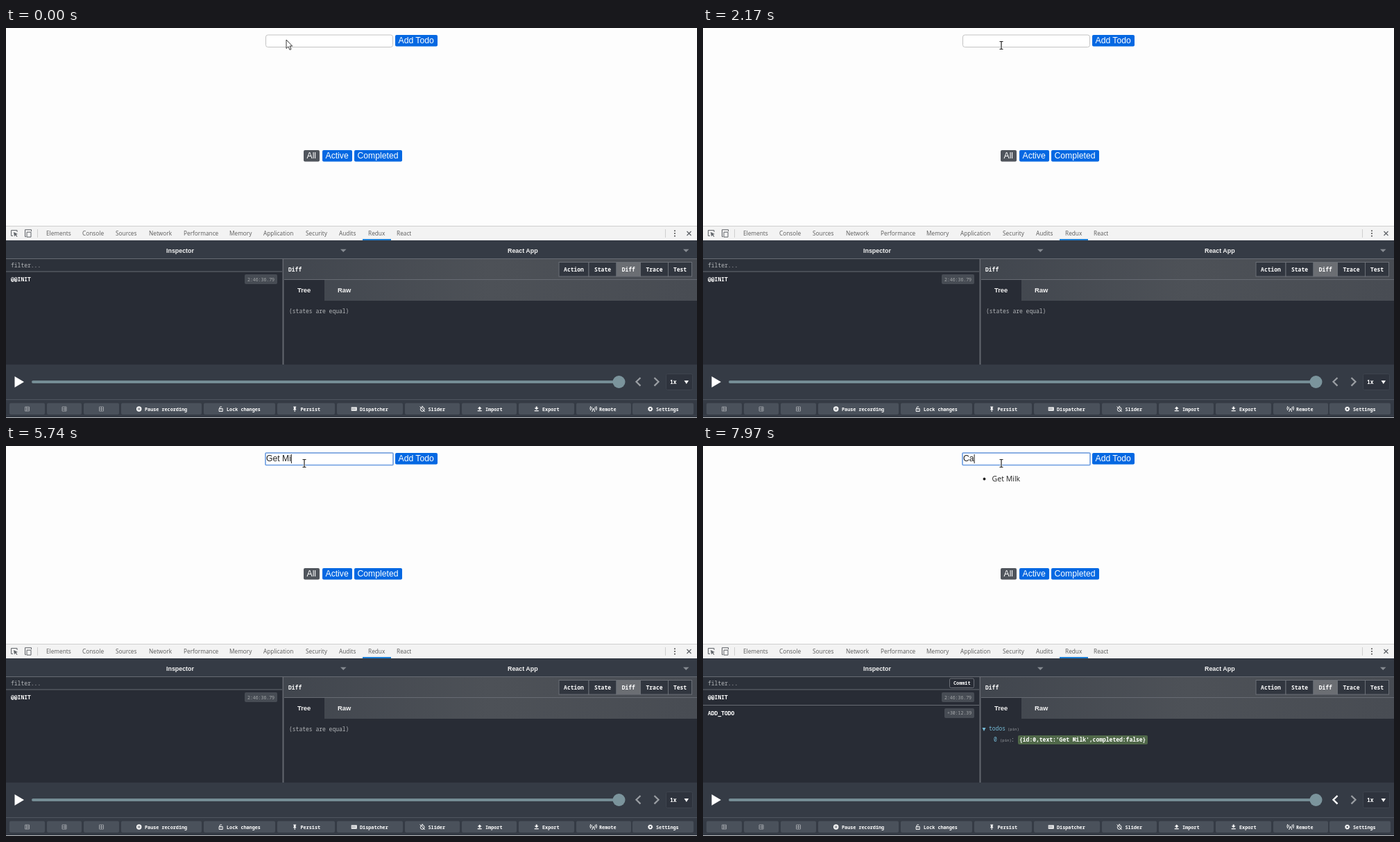
An HTML page that plays this animation: 996 by 562 pixels, repeating every 8 s.

```html
<!DOCTYPE html>
<html lang="en">
<head>
<meta charset="utf-8">
<title>Todo app with state inspector</title>
<style>
html, body { margin: 0; width: 100%; height: 100%; overflow: hidden; background: #fdfdfd; }
svg { display: block; width: 996px; height: 562px; }
text { white-space: pre; }
.app { font: 12.2px "Liberation Sans", Arial, sans-serif; }
.tabs { font: 8.3px "Open Sans", sans-serif; fill: #5a5a5a; }
.head { font: bold 8.9px "Liberation Sans", Arial, sans-serif; fill: #f4f4f4; }
.mono { font: 8px "Noto Sans Mono", monospace; fill: #b4b7ba; }
.bold { font-weight: bold; fill: #fff; }
.small { font-size: 6.8px; }
.time { font-size: 6.5px; fill: #a4a7aa; }
.pin { font-size: 5.6px; fill: #9a9da2; }
.key { fill: #76bcd8; }
.line { fill: none; stroke: #fff; }
.focus, .added { visibility: hidden; animation: 8s step-end infinite; }
.focus { animation-name: focus; }
.added { animation-name: added; }
#pointer { animation: travel 8s linear infinite; }
.arrow { animation: arrow 8s step-end infinite; }
.beam { visibility: hidden; animation: beam 8s step-end infinite; }
@keyframes focus { 42.5% { visibility: visible; } }
@keyframes added { 84.4% { visibility: visible; } }
@keyframes arrow { 24.2% { visibility: hidden; } }
@keyframes beam { 24.2% { visibility: visible; } }
@keyframes travel {
  0%, 1% { transform: translate(404px, 17px); animation-timing-function: ease-in-out; }
  11%, 18.8% { transform: translate(555px, 97px); animation-timing-function: ease-in-out; }
  25.5%, 100% { transform: translate(430px, 25px); }
}
</style>
</head>
<body>
<svg viewBox="0 0 996 562">
  <defs>
    <linearGradient id="bar">
      <stop offset="0" stop-color="#41464e"/>
      <stop offset=".5" stop-color="#4d5157"/>
      <stop offset="1" stop-color="#484c53"/>
    </linearGradient>
  </defs>
  <rect width="996" height="562" fill="#fdfdfd"/>

  <g class="app">
    <rect x="374.5" y="10" width="183" height="17.5" rx="3" fill="#fff" stroke="#c3c3c3"/>
    <rect class="focus" x="374" y="10" width="184" height="17.5" rx="1" fill="#fff" stroke="#6a9be0" stroke-width="1.6"/>
    <text id="typed" x="375" y="22" fill="#222"></text>
    <path id="caret" d="M0 12V25" stroke="#222"/>
    <g id="buttons" fill="#fff"></g>
    <g class="added">
      <circle cx="405.5" cy="47.5" r="1.9" fill="#222"/>
      <text x="416.5" y="50.5" font-size="10.6" fill="#222" font-family="Open Sans, sans-serif">Get Milk</text>
    </g>
  </g>

  <rect y="286" width="996" height="20" fill="#f3f3f3"/>
  <path d="M0 285.5H996M45.5 290V302M950.5 290V302" stroke="#cfcfcf"/>
  <g fill="none" stroke="#5f6368">
    <path d="M16 294V291.5H7.5V299.5H10"/>
    <path d="M11 294L17 297L14.5 297.8L16.5 300.5L15.5 301L13.5 298.6L12 300.5Z" fill="#5f6368" stroke="none"/>
    <path d="M29 300.5H27.5V290.5H36.5V293M30 294H36V301H30Z" transform="translate(0 .2)"/>
    <path d="M981.5 293L987.5 299M987.5 293L981.5 299" stroke-width="1.3"/>
  </g>
  <path d="M964 292.3h.01M964 296h.01M964 299.7h.01" stroke="#555" stroke-width="2.1" stroke-linecap="round"/>
  <g id="tabs" class="tabs"></g>
  <rect x="514" y="304" width="41" height="2" fill="#1c7fd6"/>

  <rect y="306" width="996" height="256" fill="#353b45"/>
  <rect y="333" width="996" height="152" fill="#282c35"/>
  <rect y="333" width="398" height="18" fill="#2c313a"/>
  <rect x="401" y="333" width="595" height="60" fill="url(#bar)"/>
  <rect x="401" y="363" width="58" height="30" fill="#282c35"/>
  <path d="M0 332.5H996M401 362.5H996M0 351H398" stroke="#676b73"/>
  <path d="M399.5 333V485" stroke="#63676f" stroke-width="2"/>
  <path d="M482 318.7H490.500L486.200 323ZM976 318.700H984.500L980.200 323Z" fill="#858a91"/>
  <g class="head">
    <text x="231" y="323.500">Inspector</text>
    <text x="723" y="323.500">React App</text>
    <g font-size="9.4"><text x="420" y="381">Tree</text><text x="478" y="381">Raw</text></g>
  </g>

  <g class="mono">
    <text x="7" y="344.500">filter...</text>
    <text class="bold" x="7" y="365">@@INIT</text>
    <rect x="344" y="355" width="47" height="14" rx="2" fill="#474c54"/>
    <text class="time" x="348" y="364.500">2:46:36.79</text>
    <text class="bold" x="407" y="350.500">Diff</text>
    <g id="modes"></g>
    <g class="added">
      <path d="M0 373.500H398" stroke="#676b73"/>
      <rect x="355.500" y="335" width="35" height="13.500" rx="2" fill="#282c35" stroke="#6c7078"/>
      <text class="bold small" x="361" y="344.300">Commit</text>
      <text class="bold" x="7" y="387.700">ADD_TODO</text>
      <rect x="348" y="378" width="43" height="14" rx="2" fill="#474c54"/>
      <text class="time" x="352" y="387.300">+30:12.39</text>
      <rect x="401" y="394" width="250" height="40" fill="#282c35"/>
      <path class="key" d="M402.500 406H407.500L405 411Z"/>
      <text class="key" x="412" y="410.300">todos</text>
      <text class="pin" x="439" y="410">(pin)</text>
      <text class="key" x="419" y="426">0</text>
      <text class="pin" x="428" y="426">(pin)</text>
      <text x="444" y="426">:</text>
      <rect x="454" y="417" width="187" height="13" rx="2" fill="#506849"/>
      <text class="bold" x="456" y="426">{id:0,text:'Get Milk',completed:false}</text>
    </g>
    <text id="equal" x="408" y="410.500">(states are equal)</text>
  </g>

  <path d="M12.500 502L26 510L12.500 518Z" fill="#fff"/>
  <path d="M39 510H884" stroke="#758d95" stroke-width="4" stroke-linecap="round"/>
  <circle cx="883.500" cy="510" r="9" fill="#7b949c"/>
  <g fill="none" stroke="#9a9ea3" stroke-width="2.200">
    <path d="M914.500 504L908.500 509.800L914.500 515.600M934.500 504L940.500 509.800L934.500 515.600"/>
    <path class="added" d="M914.500 504L908.500 509.800L914.500 515.600" stroke="#fff"/>
  </g>
  <rect x="951.500" y="498.500" width="38" height="23" rx="2" fill="#2e333d" stroke="#3e444e"/>
  <text class="mono bold" x="957" y="513">1x</text>
  <path d="M977.500 508H984L980.800 513Z" fill="#fff"/>

  <path d="M0 535.500H996" stroke="#4f5660"/>
  <g id="footer" class="mono"></g>
  <path d="M0 561.500H996" stroke="#b9bbbe"/>

  <g id="pointer">
    <path class="arrow" d="M0 0V12.500L2.900 9.800L5 14.400L7 13.500L5 9H8.700Z" fill="#fff" stroke="#222" stroke-width=".9"/>
    <g class="beam" fill="none">
      <path d="M-3 -5.500H3M0 -5.500V5.500M-3 5.500H3" stroke="#fff" stroke-width="2.600"/>
      <path d="M-2.500 -5.500H2.500M0 -5.500V5.500M-2.500 5.500H2.500" stroke="#222" stroke-width="1.200"/>
    </g>
  </g>
</svg>
<script>
const $ = id => document.getElementById(id);
const box = (x, y, w, h, fill, extra = '') =>
  `<rect x="${x}" y="${y}" width="${w}" height="${h}" fill="${fill}" ${extra}/>`;
const label = (x, y, s, cls = '') => `<text x="${x}" y="${y}" class="${cls}">${s}</text>`;

const blue = '#0468e2';
$('buttons').innerHTML = [
  ['Add Todo', 561, 10, 61, blue], ['All', 429, 176, 23, '#50555c'],
  ['Active', 456, 176, 43, blue], ['Completed', 502, 176, 69, blue]
].map(([s, x, y, w, fill]) => box(x, y, w, 16.5, fill, 'rx="2"') + label(x + 4.5, y + 12, s)).join('');

$('tabs').innerHTML = Object.entries({
  Elements: 58, Console: 110, Sources: 158, Network: 206, Performance: 256, Memory: 322,
  Application: 371, Security: 432, Audits: 480, Redux: 522, React: 563
}).map(([s, x]) => label(x, 299, s)).join('');

$('modes').innerHTML = [
  ['Action', 797, 43], ['State', 840, 40], ['Diff', 880, 34.5], ['Trace', 914.5, 40], ['Test', 954.5, 34]
].map(([s, x, w]) =>
  box(x, 337.5, w, 20.5, s === 'Diff' ? '#6b6e73' : '#31363f', 'stroke="#6b6f76"') +
  label(x + (w - s.length * 4.8) / 2, 350.5, s, 'bold')).join('');

// Icons are drawn around their own centre.
const panel = d => `<path d="M-3 -3H3V3H-3Z${d}" fill="none" stroke="#a9adb2" stroke-width=".8"/>`;
const solid = d => `<path d="${d}" fill="#fff"/>`;
const line = d => `<path d="${d}" class="line"/>`;
const tray = 'M-3 2H3V3.200H-3Z';
const icons = {
  pause: '<circle r="3.700" fill="#fff"/><path d="M-1 -1.700V1.700M1 -1.700V1.700" stroke="#4a515b"/>',
  lock: line('M-2.500 -.500H2.500V3.500H-2.500ZM-1.500 -.500V-2.500Q0 -4.500 1.500 -2.500M0 1V2'),
  pin: solid('M-2 -3.500H2V-2.500H1.300V0L2.500 1.300H.5V4H-.5V1.300H-2.500L-1.300 0V-2.500H-2Z'),
  keys: solid('M-4 -2.700H4V2.700H-4Z') +
    '<path d="M-3 -1H3M-3 .500H3" stroke="#4a515b" stroke-dasharray="1"/>',
  timer: '<circle cy=".500" r="2.900" class="line"/>' + line('M-3.500 -3.500L3.500 4M-1 -3.700H1'),
  upload: solid('M0 -3.500L3 -.500H1V1.300H-1V-.500H-3Z' + tray),
  download: solid('M0 1.300L3 -1.500H1V-3.500H-1V-1.500H-3Z' + tray),
  antenna: line('M0 -1L-2 4M0 -1L2 4M-2.200 -3Q-3.200 -1.300 -2.200 .500M2.200 -3Q3.200 -1.300 2.200 .500M-4 -4Q-5.500 -1 -4 2M4 -4Q5.500 -1 4 2'),
  gear: '<circle r="2.200" class="line" stroke-width="1.700"/><circle r="3.200" class="line" stroke-dasharray="1.250"/>'
};
$('footer').innerHTML = [
  [5, 51, panel('M-1 -3V3M-1 -1H3M-1 1H3')], [59, 50, panel('M-3 0H3M1 -3V3')], [112, 51, panel('M0 -3V3M-3 0H3')],
  [166, 116, icons.pause, 'Pause recording', 200], [285, 103, icons.lock, 'Lock changes', 318],
  [391, 83, icons.pin, 'Persist', 424.5], [477, 95, icons.keys, 'Dispatcher', 510],
  [575, 79, icons.timer, 'Slider', 608.5], [657, 79, icons.upload, 'Import', 691],
  [739, 80, icons.download, 'Export', 773], [822, 79, icons.antenna, 'Remote', 855],
  [903, 88, icons.gear, 'Settings', 937]
].map(([x, w, icon, s, tx]) =>
  box(x, 540.5, w, 16.5, '#4a515b', 'rx="2"') +
  `<g transform="translate(${s ? tx - 8.3 : x + w / 2} 549)">${icon}</g>` +
  (s ? label(tx, 551.5, s, 'bold small') : '')).join('');

const LOOP = 8000, FOCUS = 3400, SUBMIT = 6752;
const keys = [
  [FOCUS, ''], [4750, 'G'], [4910, 'Ge'], [5080, 'Get'], [5240, 'Get '], [5460, 'Get M'],
  [5650, 'Get Mi'], [5850, 'Get Mil'], [6020, 'Get Milk'], [SUBMIT, ''], [7620, 'C'], [7840, 'Ca']
];
const typed = $('typed'), caret = $('caret'), equal = $('equal');
let start;

function render(now) {
  start ??= now;
  const t = (now - start) % LOOP;
  const [since, value] = keys.findLast(k => k[0] <= t) ?? [Infinity, ''];
  if (typed.textContent !== value) typed.textContent = value;
  const width = value ? typed.getComputedTextLength() : 0;
  caret.setAttribute('transform', `translate(${375.5 + width} 0)`);
  caret.style.visibility = t >= since && (t - since) % 1000 < 500 ? 'visible' : 'hidden';
  equal.style.visibility = t < SUBMIT ? 'visible' : 'hidden';
  requestAnimationFrame(render);
}
requestAnimationFrame(render);
</script>
</body>
</html>
```
